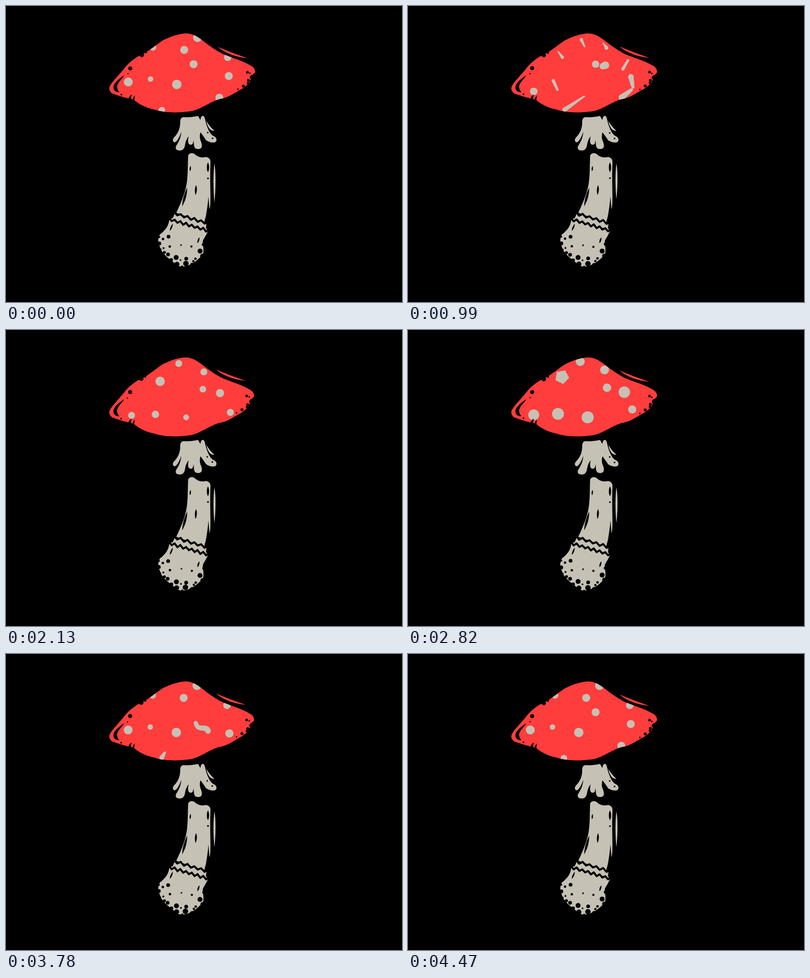
Recreate the animation shown at these times as an HTML page with a canvas. Size 800 by 600 pixels, loop 4500 ms.

```html
<!DOCTYPE html>
<html lang="en">
<head>
<meta charset="utf-8">
<title>Mushroom</title>
<style>
html, body { margin: 0; width: 100%; height: 100%; overflow: hidden; background: #000; }
canvas { display: block; }
</style>
</head>
<body>
<canvas id="stage" width="800" height="600"></canvas>
<script>
const ctx = document.getElementById('stage').getContext('2d');
const LOOP = 4500, STEP = 30;
const RED = '#ff3d3d', CREAM = '#c5c1b5', BLACK = '#000';
const shape = (...d) => new Path2D(d.join(' '));

const cap = shape(
  'M209 165C212 155 228 141 240 125C250 113 262 104 275 98C290 91 305 77 318 69',
  'C335 61 350 56 364 55.5C378 56 386 62 396 69C410 80 425 91 440 98',
  'C460 106 480 112 494 120.5C501 124 504 130 503 135L498 140L494 154L480 166',
  'C460 177 450 186 430 189C410 196 395 208 376 213C355 216 325 218 300 210',
  'C280 206 268 198 258 190C240 186 225 181 214 177C209 172 208 168 209 165Z');
const capCuts = shape(
  'M239 140C228 148 217 156 217 165C217 172 223 175 229 175C224 168 223 163 226 158C229 152 235 147 239 140Z',
  'M248 192C247 185 250 181 255 180C252 184 253 188 254 194Z',
  'M256 195C255 188 257 185 261 181C259 187 259 190 261 196Z');
const streak = shape('M428 83C447 91 468 99 488 106C468 104 446 98 428 83Z');
const skirt = shape(
  'M352 235C352 228 355 224 362 225.5C372 226 382 224 388 223C390 226 391 229 393 231',
  'C393 222 400 219 402 229C405 243 410 257 418 263C426 266 427 272 423 276',
  'C418 278 410 276 404 272C402 268 398 263 393 256C391 262 391 268 394 275',
  'C397 283 397 290 388 290C378 290 380 279 379 272C378 277 378 282 372 281',
  'C366 280 368 270 369 264C366 268 363 273 362 280C361 288 358 293 351 293',
  'C344 293 341 289 344 283C349 276 354 265 354 255C352 262 347 273 342 276',
  'C338 277 335 272 339 267C348 258 352 248 352 235Z');
const skirtSliver = shape('M405 233C409 240 414 247 421 253C414 254 407 247 405 233Z');
const stem = shape(
  'M368 303C370 298 376 297 381 300C388 307 396 308 404 306C410 307 414 311 413 318',
  'C412 345 413 370 413 385C413 395 413 405 411.5 412C410 405 410 395 409 386',
  'C408 400 406 412 404 425L400 440L344 419C352 402 362 380 365 360C368 340 367 320 368 303Z');
const stemSliver = shape('M421 319C424 335 424 370 421 399C418.5 370 418.5 340 421 319Z');
const stemCuts = shape(
  'M408 317C411 322 411 332 408 337C405 332 405 322 408 317Z',
  'M373 324C374 328 374 331 372 335C370 331 371 327 373 324Z',
  'M384 363C386.5 369 386 377 383 383C381 377 381 369 384 363Z',
  'M366 368C360 380 356 395 356 406C362 395 366 385 366 368Z',
  'M391 469C387 472 386 477 387 481C390 478 391 474 391 469Z',
  'M337 441C332 447 331 452 331 456C335 452 337 447 337 441Z');
const bulb = shape(
  'M341 420L405 441L404 450L408 457C405 463 402 468 398 475C396 482 401 492 398 503',
  'C392 510 382 520 372 524C364 528 356 530 346 526C340 520 330 513 322 506',
  'C318 500 312 496 311 488C307 482 306 472 311 463C322 455 329 445 330 432L337 430Z');

// x, y, radius of round holes
const capDots = [
  [251, 126, 4], [274, 99, 4.5], [282, 94, 2.5], [246, 137.5, 1.2], [233, 179.5, 1.7],
  [488, 134, 2.7], [493, 136, 1.6], [498, 145, 5], [490, 151, 3], [489, 156, 2.6],
  [479, 162, 3], [468, 168.5, 1.5], [495, 153, 3]];
const stemDots = [
  [408, 349, 1.8], [417, 268, 1.7], [407, 257, 1.6], [328, 468, 3.8], [317, 472, 2.5],
  [331, 487, 2.5], [354, 484.5, 1.7], [375, 488, 2.2], [344, 510, 5], [364, 512, 3.8],
  [345, 523, 5], [363, 522, 5.5], [327, 504, 3.8], [392, 497, 5], [383, 512, 2.5],
  [379, 517, 2.4], [353, 515, 1.8], [334, 515, 3.5], [318, 491, 2], [309, 468, 2.2],
  [309, 481, 4], [311, 494, 3], [320, 500, 3], [397, 507, 4.5], [399, 483, 3],
  [333, 525, 5], [356, 528, 2], [376, 525, 4], [318, 508, 4]];

// first place and radius, second place and its two radii, swollen place and radius
const spots = [
  [387, 64, 9, 401, 85, 4.5, 7, 397, 81, 9],
  [297, 84, 6.5, 312, 104, 7, 9.5, 311, 95, 12],
  [360, 89, 8, 350, 68, 6, 7, 348, 64, 9],
  [448, 104, 7.5, 434, 128, 7, 8.3, 437, 126, 11.5],
  [247, 154, 9, 254, 173, 6.3, 7, 254, 172, 11],
  [292, 148, 5.5, 302.5, 171, 6, 7.5, 303, 170, 12],
  [345, 159, 9.5, 399, 120, 7, 6.7, 402, 117, 8.5],
  [450, 142, 8, 455, 167, 7, 7, 453, 161, 8],
  [431, 186, 8, 455, 167, 7, 7, 453, 161, 8],
  [315, 211, 6.5, 365, 177, 3, 5.7, 363, 177, 12],
  [379, 118, 8, 365, 177, 6.5, 5.7, 363, 177, 12]];
// start and lag of each trip, bends on the way, thinning of the tail
const trips = {
  4: { go: 300, goLag: 110, out: [[260, 158]] },
  6: { go: 340, out: [[343, 140], [372, 130]] },
  7: { back: 3740, backLag: 180 },
  8: { back: 3740, backLag: 180 },
  9: { back: 3250, backLag: 210, home: [[332, 188]] },
  10: { go: 960, goLag: 480, back: 3430, backLag: 110, thin: .3,
        out: [[398, 140], [410, 165], [392, 193]],
        home: [[408, 177], [408, 153], [388, 147]] }
};

const mix = (a, b, u) => a + (b - a) * u;
const clamp = u => Math.max(0, Math.min(1, u));
const ease = u => (u = clamp(u)) < .5 ? 2 * u * u : 1 - 2 * (1 - u) * (1 - u);
const bump = (t, at, w) => Math.exp(-(((t - at) / w) ** 2));

function keyed(t, times, values) {
  let i = 0;
  while (i < times.length - 2 && t > times[i + 1]) i++;
  return mix(values[i], values[i + 1], clamp((t - times[i]) / (times[i + 1] - times[i])));
}

// smooth curve through a few points, u from 0 to 1
function along(pts, u) {
  const n = pts.length - 1, i = Math.min(n - 1, Math.floor(u * n)), f = u * n - i;
  const at = k => pts[Math.max(0, Math.min(n, k))];
  const [a, b, c, d] = [at(i - 1), at(i), at(i + 1), at(i + 2)];
  return [0, 1].map(k => b[k] + .5 * f * (c[k] - a[k] + f * (2 * a[k] - 5 * b[k] + 4 * c[k] - d[k]
    + f * (3 * (b[k] - c[k]) + d[k] - a[k]))));
}

function disc(x, y, r) {
  ctx.beginPath();
  ctx.arc(x, y, Math.max(0, r), 0, 7);
  ctx.fill();
}

function fill(path, colour) {
  ctx.fillStyle = colour;
  ctx.fill(path);
}

function drawSpot(s, i, t) {
  const { go = 480 + i * 20, goLag = 260, back = 2850 + i * 20, backLag = 200,
          out = [], home = [], thin = .9 } = trips[i] || {};
  const outward = t < 2130;
  const swell = outward ? 0 : ease((t - 2130) / 690);
  const first = [s[0], s[1]];
  const second = [mix(s[3], s[7], swell), mix(s[4], s[8], swell)];
  const pts = outward ? [first, ...out, second] : [second, ...home, first];
  const start = outward ? go : back, lag = outward ? goLag : backLag;
  const head = ease((t - start) / 500), tail = ease((t - start - lag) / 500);
  const r = keyed(t, [0, 480, 1470, 2130, 2820, 3780, LOOP], [s[2], s[2], s[5], s[6], s[9], s[2], s[2]]);
  const rTail = r * (1 - thin * Math.sin(Math.PI * tail));
  const rHead = r * (.35 + .65 * tail * tail);
  const lift = i === 10 ? -8 * bump(t, 480, 200) : 0;
  const n = head - tail > .001 ? 48 : 0;
  for (let k = 0; k <= n; k++) {
    const f = n ? k / n : 0;
    const [x, y] = along(pts, mix(tail, head, f));
    disc(x, y + lift, mix(rTail, rHead, f));
  }
  if (i === 1) {
    const lobe = bump(t, 2820, 110);
    if (lobe > .05) {
      const [x, y] = along(pts, tail);
      for (let k = 0; k < 5; k++) {
        const a = k * Math.PI * .4 + .15;
        disc(x + Math.cos(a) * r * .9 * lobe, y + Math.sin(a) * r * .9 * lobe, r * .27);
      }
    }
  }
}

function drawDots(dots, pose) {
  ctx.fillStyle = BLACK;
  dots.forEach(([x, y, r], i) => disc(
    x + .5 * Math.sin(i * 7 + pose * 3), y + .5 * Math.cos(i * 5 + pose * 4), r));
}

function zigzag(x0, y0, x1, y1, teeth, pose) {
  ctx.beginPath();
  for (let k = 0; k <= teeth * 2; k++) {
    const u = k / teeth / 2;
    ctx.lineTo(mix(x0, x1, u), mix(y0, y1, u) + (k % 2 ? 2.6 : -2.6) + .4 * Math.sin(k * 4 + pose * 2));
  }
  ctx.stroke();
}

// poses of the trembling line work
const order = [0, 1, 1, 2, 2];
const capWidth = [1, .993, 1];
const streakShift = [[0, 0], [-4, -3], [-1, -1]];
const sliverHeight = [1, .91, .91];

function draw(t) {
  const pose = order[(t / STEP) % order.length];
  ctx.fillStyle = BLACK;
  ctx.fillRect(0, 0, 800, 600);

  ctx.save();
  ctx.translate(209, 0);
  ctx.scale(capWidth[pose], 1);
  ctx.translate(-209, 0);
  fill(cap, RED);
  ctx.save();
  ctx.clip(cap);
  ctx.fillStyle = CREAM;
  spots.forEach((s, i) => drawSpot(s, i, t));
  ctx.restore();
  fill(capCuts, BLACK);
  drawDots(capDots, pose);
  ctx.restore();

  ctx.save();
  ctx.translate(...streakShift[pose]);
  fill(streak, RED);
  ctx.restore();

  [skirt, skirtSliver, stem, bulb].forEach(p => fill(p, CREAM));
  ctx.save();
  ctx.translate(0, 319);
  ctx.scale(1, sliverHeight[pose]);
  ctx.translate(0, -319);
  fill(stemSliver, CREAM);
  ctx.restore();

  fill(stemCuts, BLACK);
  drawDots(stemDots, pose);
  ctx.strokeStyle = BLACK;
  ctx.lineWidth = 4;
  ctx.lineJoin = pose === 1 ? 'miter' : 'round';
  zigzag(339, 420, 408, 441, 5, pose);
  zigzag(329, 432, 410, 456, 7, pose);
}

function tick() {
  draw(Math.floor(performance.now() % LOOP / STEP) * STEP);
  requestAnimationFrame(tick);
}
tick();
</script>
</body>
</html>
```
